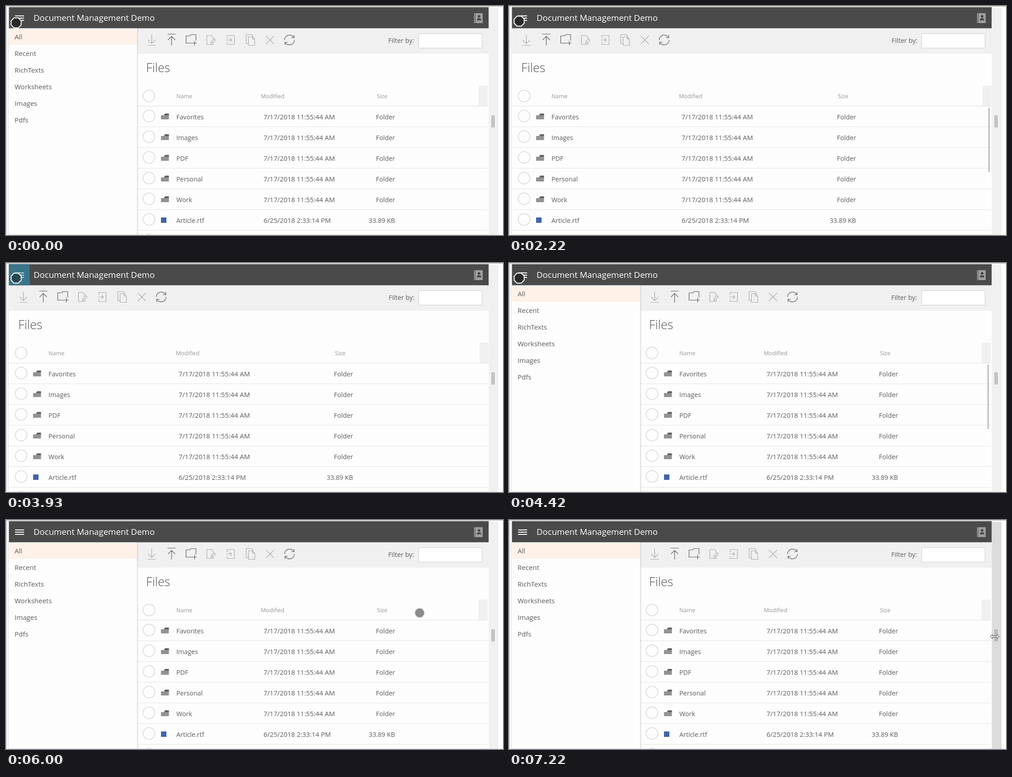
These frames come from a looping animation (1100x509 px, 8000 ms). An HTML page with a canvas:

```html
<!DOCTYPE html>
<html>
<head>
<meta charset="utf-8">
<style>
html, body { margin: 0; width: 100%; height: 100%; overflow: hidden; background: #fff; }
canvas { display: block; }
</style>
</head>
<body>
<canvas id="stage" width="1100" height="509"></canvas>
<script>
const ctx = document.getElementById('stage').getContext('2d');
const LOOP = 8000;
const menu = ['All', 'Recent', 'RichTexts', 'Worksheets', 'Images', 'Pdfs'];
const folders = ['Favorites', 'Images', 'PDF', 'Personal', 'Work'];
const files = folders.map(name => [name, '7/17/2018 11:55:44 AM', 'Folder']);
files.push(['Article.rtf', '6/25/2018 2:33:14 PM', '33.89 KB']);

const lerp = (a, b, k) => a + (b - a) * k;
const ramp = (t, from, to) => Math.min(1, Math.max(0, (t - from) / (to - from)));
const within = (t, from, to) => t >= from && t < to;

function rect(x, y, w, h, color) {
  ctx.fillStyle = color;
  ctx.fillRect(x, y, w, h);
}

function text(str, x, y, size, color = '#5c5c5c', weight = 400, align = 'left') {
  ctx.font = `${weight} ${size}px "Open Sans", "Noto Sans", sans-serif`;
  ctx.fillStyle = color;
  ctx.textAlign = align;
  ctx.fillText(str, x, y);
}

function stroke(d, color, width = 1.2) {
  ctx.strokeStyle = color;
  ctx.lineWidth = width;
  ctx.stroke(new Path2D(d));
}

function fill(d, color) {
  ctx.fillStyle = color;
  ctx.fill(new Path2D(d));
}

function circle(x, y, r, color, width) {
  ctx.beginPath();
  ctx.arc(x, y, r, 0, 7);
  ctx.strokeStyle = color;
  ctx.lineWidth = width;
  ctx.stroke();
}

// Toolbar icons: outline around the icon's centre, and whether it is enabled
const icons = [
  ['M0 -12V8M-8 0L0 8L8 0M-9 12H9', false],
  ['M0 12V-8M-8 0L0 -8L8 0M-9 -13H9', true],
  ['M4 7H-11V-9H-3L0 -12H11V1M8 2V12M3 7H13', true],
  ['M5 5V10H-9V-10H1L5 -6V-3M0 8L1 3L7 -3L10 0L4 6Z', false],
  ['M-7 -4V-10H9V10H-7V5M-9 0H3M-1 -4L3 0L-1 4', false],
  ['M-4 -7H5L10 -2V12H-4ZM5 -7V-2H10M-4 8H-9V-12H3L6 -9V-7', false],
  ['M-9 -9L9 9M9 -9L-9 9', false],
  ['M-11 0A11 11 0 0 1 9.500 -5.500M10 -11V-5H4M11 0A11 11 0 0 1 -9.500 5.500M-10 11V5H-4', true]
];

function drawFrame() {
  rect(0, 0, 1100, 509, '#fff');
  rect(0, 0, 1100, 1, '#a6a6a6');
  rect(0, 0, 1, 509, '#b4b4b4');
  rect(1, 3, 5, 506, '#f6f6f6');
  rect(5, 50, 1, 459, '#e2e2e2');
}

function drawMenu() {
  rect(6, 49, 285, 459, '#fdfdfd');
  rect(7, 51, 283, 35, '#fdf1e8');
  menu.forEach((item, i) => text(item, 19, 74 + 37 * i, 15));
}

function drawHeader(pressed) {
  rect(6.5, 2.5, 1062, 47, '#4a4a4a');
  if (pressed) rect(6.5, 2.5, 46, 47, '#3b7488');
  for (const y of [21, 26, 31]) rect(20, y, 20, 2, pressed ? '#a9dcec' : '#fff');
  text('Document Management Demo', 61, 33, 18.6, '#fff');
  rect(1036, 16, 2, 22, '#a0a0a0');
  rect(1039, 16, 16, 22, '#a0a0a0');
  fill('M1044 23a3 3 0 1 1 6 0a3 3 0 1 1 -6 0M1042 32Q1042 27 1047 27T1052 32Z', '#4a4a4a');
}

function drawToolbar(closed) {
  const left = 291 - 284 * closed;
  rect(left, 49, 1068.5 - left, 57, '#f0f0f0');
  icons.forEach(([d, enabled], i) => {
    ctx.save();
    ctx.translate(322.5 - 284 * closed + Math.round(43.6 * i), 75.5);
    stroke(d, enabled ? '#585858' : '#a8a8a8');
    ctx.restore();
  });
  text('Filter by:', 846 + closed, 82, 14.4);
  rect(913, 61, 141, 33, '#cecece');
  rect(914, 62, 139, 31, '#fff');
}

function drawFolder(x, y) {
  fill(`M${x} ${y + 4}H${x + 7}L${x + 9} ${y + 2}H${x + 17.5}V${y + 13}H${x}Z`, '#929292');
  fill(`M${x + 7} ${y + 3}L${x + 9} ${y}H${x + 17.5}V${y + 4}H${x + 7}Z`, '#626262');
}

function drawFiles(closed, showNext, scrollAlpha) {
  const left = 291 - 284 * closed;
  const shift = -283 * closed;
  const edge = 1066 + 2 * closed;
  const dateX = lerp(570, 382, closed);
  const sizeX = lerp(861, 768, closed);
  ctx.save();
  ctx.beginPath();
  ctx.rect(left, 106, 1069 - left, 402);
  ctx.clip();
  rect(left, 106, 1068.5 - left, 402, '#fdfdfd');
  text('Files', 310 + shift, 147, 27.2, '#505050', 300);

  circle(316.5 + shift, 200, 13, '#e0e0e0', 2);
  text('Name', 377 + shift, 205, 12.6, '#969696');
  text('Modified', dateX - 6, 205, 12.6, '#969696');
  text('Size', sizeX - 40, 205, 12.6, '#969696');
  rect(edge - 20, 177, 20, 45, '#f0f0f0');
  rect(left, 222, edge - left, 1, '#dedede');

  files.forEach(([name, date, size], i) => {
    const y = 244 + 46 * i;
    circle(316.5 + shift, y + 0.5, 13, '#e0e0e0', 2);
    if (size === 'Folder') drawFolder(343 + shift, y - 5);
    else rect(343 + shift, y - 4, 12, 12, '#3f66a8');
    text(name, 377 + shift, y + 8, 14.3);
    text(date, dateX, y + 8, 14.7);
    text(size, sizeX, y + 8, 14.3, '#5c5c5c', 400, 'right');
    rect(left, y + 24, edge - left, 1, '#e2e2e2');
  });
  if (showNext) circle(316.5 + shift, 520.5, 13, '#e0e0e0', 2);

  ctx.globalAlpha = scrollAlpha;
  rect(edge - 7, 226, 3, 143, '#bdbdbd');
  ctx.restore();
  if (closed < 1) {
    rect(left - 1, 50, 1, 458, '#d8d8d8');
    rect(left, 50, 2, 458, 'rgba(0,0,0,.06)');
  }
  rect(7, 508, 1062, 1, '#d4d4d4');
}

function drawSplitter(hover) {
  const shade = Math.round(lerp(240, 220, hover));
  rect(1068.5, 4, 21.5, 505, `rgb(${shade},${shade},${shade})`);
  rect(1075, 243, 2, 27, '#9a9a9a');
  rect(1079, 243, 2, 27, '#9a9a9a');
}

function drawPointer(x, y, pressed) {
  const dark = y < 50;
  ctx.beginPath();
  for (let i = 0; i < 8; i++) {
    const a = (i + 0.5) * Math.PI / 4;
    ctx.lineTo(x + 12 * Math.cos(a), y + 12 * Math.sin(a));
  }
  ctx.closePath();
  if (dark) {
    ctx.fillStyle = pressed ? '#28464f' : '#292929';
    ctx.fill();
    ctx.strokeStyle = '#fff';
    ctx.lineWidth = 2;
    ctx.stroke();
  } else {
    ctx.fillStyle = '#8c8c8c';
    ctx.beginPath();
    ctx.arc(x, y, 10, 0, 7);
    ctx.fill();
    circle(x, y, 11, '#d6d6d6', 1);
  }
}

function drawResize(x, y) {
  ctx.save();
  ctx.translate(x, y);
  const arrow = 'M-10 0L-5 -5V-1.500H5V-5L10 0L5 5V1.500H-5V5Z';
  fill(arrow, '#fff');
  stroke(arrow, '#333', 1);
  ctx.restore();
}

// 0 = side menu open, 1 = closed
function menuClosed(t) {
  if (t < 1770) return 0;
  if (t < 1830) return 0.5;
  if (t < 4020) return 1;
  if (t < 4060) return 0.7;
  return t < 4110 ? 0.3 : 0;
}

function scrollAlpha(t) {
  if (within(t, 2190, 2220)) return 0.5;
  if (within(t, 2220, 2900)) return 1 - ramp(t, 2660, 2880);
  return t >= 4420 ? 1 - ramp(t, 5080, 5320) : 0;
}

function draw(t) {
  const closed = menuClosed(t);
  const pressed = within(t, 1640, 1830) || within(t, 3930, 4110);
  const showNext = !within(t, 2190, 2340) && !within(t, 4420, 4820);
  drawFrame();
  drawMenu();
  drawToolbar(closed);
  drawFiles(closed, showNext, scrollAlpha(t));
  drawHeader(pressed);
  drawSplitter(ramp(t, 6940, 7220));

  if (t >= 6940) {
    drawResize(lerp(1071, 1075, ramp(t, 6940, 7100)), 259);
    return;
  }
  const away = ramp(t, 5860, 6000);
  const across = ramp(t, 6270, 6700);
  const x = lerp(lerp(22.5, 915.5, away), 1065.5, across);
  const y = lerp(lerp(lerp(37.5, 33.7, ramp(t, 50, 420)), 206.5, away), 258, across);
  drawPointer(x, y, pressed);
}

function tick() {
  draw(performance.now() % LOOP);
  requestAnimationFrame(tick);
}
tick();
</script>
</body>
</html>
```
